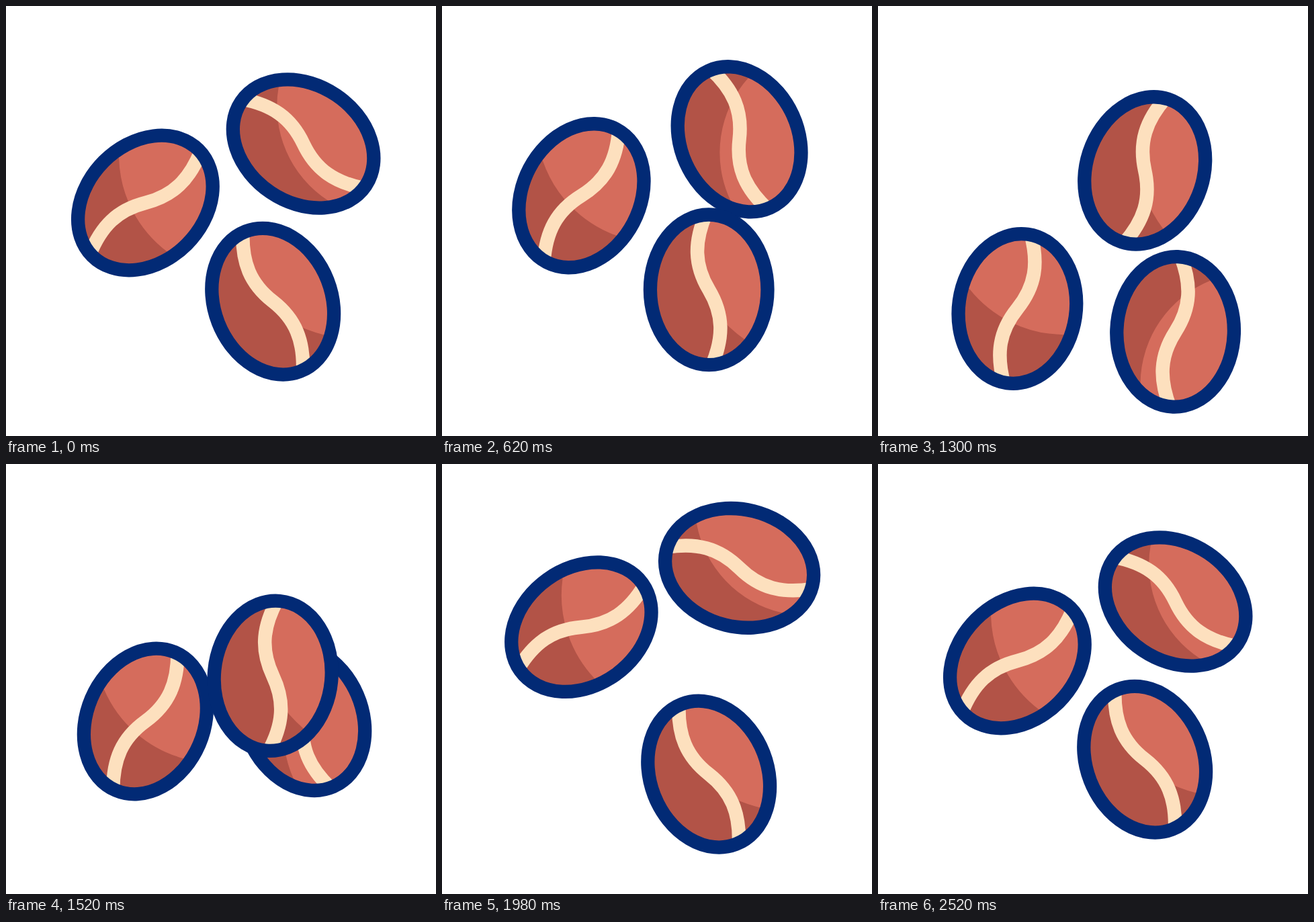
Recreate the animation shown at these times as an HTML page. Size 640 by 640 pixels, loop 2620 ms.

```html
<!DOCTYPE html>
<html lang="en">
<head>
<meta charset="utf-8">
<title>Tossed coffee beans</title>
<style>
  html, body { margin: 0; height: 100%; overflow: hidden; background: #fff; }
  svg { display: block; width: 100%; height: 100%; }
  .skin { fill: #d56c5c; }
  .shade { fill: #b25347; clip-path: url(#body); }
  .seam { fill: none; stroke: #fde0be; stroke-width: 20.5; }
  .rim { fill: none; stroke: #022a75; stroke-width: 20.3; }
</style>
</head>
<body>
<svg viewBox="0 0 640 640">
  <defs>
    <ellipse id="oval" rx="87.3" ry="111.8"/>
    <clipPath id="body"><use href="#oval"/></clipPath>
    <path id="seam" d="M-4-113C-22-71-22-37 0 0S22 71 4 113"/>
  </defs>
</svg>
<script>
const LOOP = 2620;
const TIMES = [0, 402, 1200, 2000, 2400];

// y and turn hold one value per entry in TIMES; flip mirrors the seam
const beans = [
  {
    x: 207.4, flip: -1,
    y: [293, 242, 460, 242.3, 293],
    turn: [45, 32.5, 6, 54.5, 45],
    shade: 'M-75-19.4A181 181 0 0 0 74 28.5H130V130H-130V-19.4z'
  },
  {
    x: 442.6, flip: -1,
    y: [205, 130, 500, 154.3, 205],
    turn: [-56, -31, 5.5, -76.3, -56],
    shade: 'M50-78A167 167 0 0 0-49.5 78V130H-130V-130H50z'
  },
  {
    x: 397.2, flip: 1,
    y: [439.7, 464.7, 235, 462, 439.7],
    turn: [-21.3, -4.7, 20, -21.3, -21.3],
    shade: 'M-4-113C-22-71-22-37 0 0L10 34Q30 58 53 74V130H-130V-130H-4z'
  }
];

const svg = document.querySelector('svg');
for (const bean of beans) {
  bean.node = document.createElementNS('http://www.w3.org/2000/svg', 'g');
  bean.node.innerHTML = `
    <use href="#oval" class="skin"/>
    <path class="shade" d="${bean.shade}"/>
    <use href="#seam" class="seam" transform="scale(${bean.flip} 1)"/>
    <use href="#oval" class="rim"/>`;
  svg.append(bean.node);
}

const smooth = u => u * u * (3 - 2 * u);

function valueAt(keys, t) {
  const next = TIMES.findIndex(time => time > t);
  if (next < 0) return keys.at(-1);
  const start = TIMES[next - 1];
  const u = (t - start) / (TIMES[next] - start);
  return keys[next - 1] + (keys[next] - keys[next - 1]) * smooth(u);
}

function draw() {
  const t = performance.now() % LOOP;
  for (const { node, x, y, turn } of beans) {
    node.setAttribute('transform', `translate(${x} ${valueAt(y, t)}) rotate(${valueAt(turn, t)})`);
  }
  requestAnimationFrame(draw);
}
draw();
</script>
</body>
</html>
```
